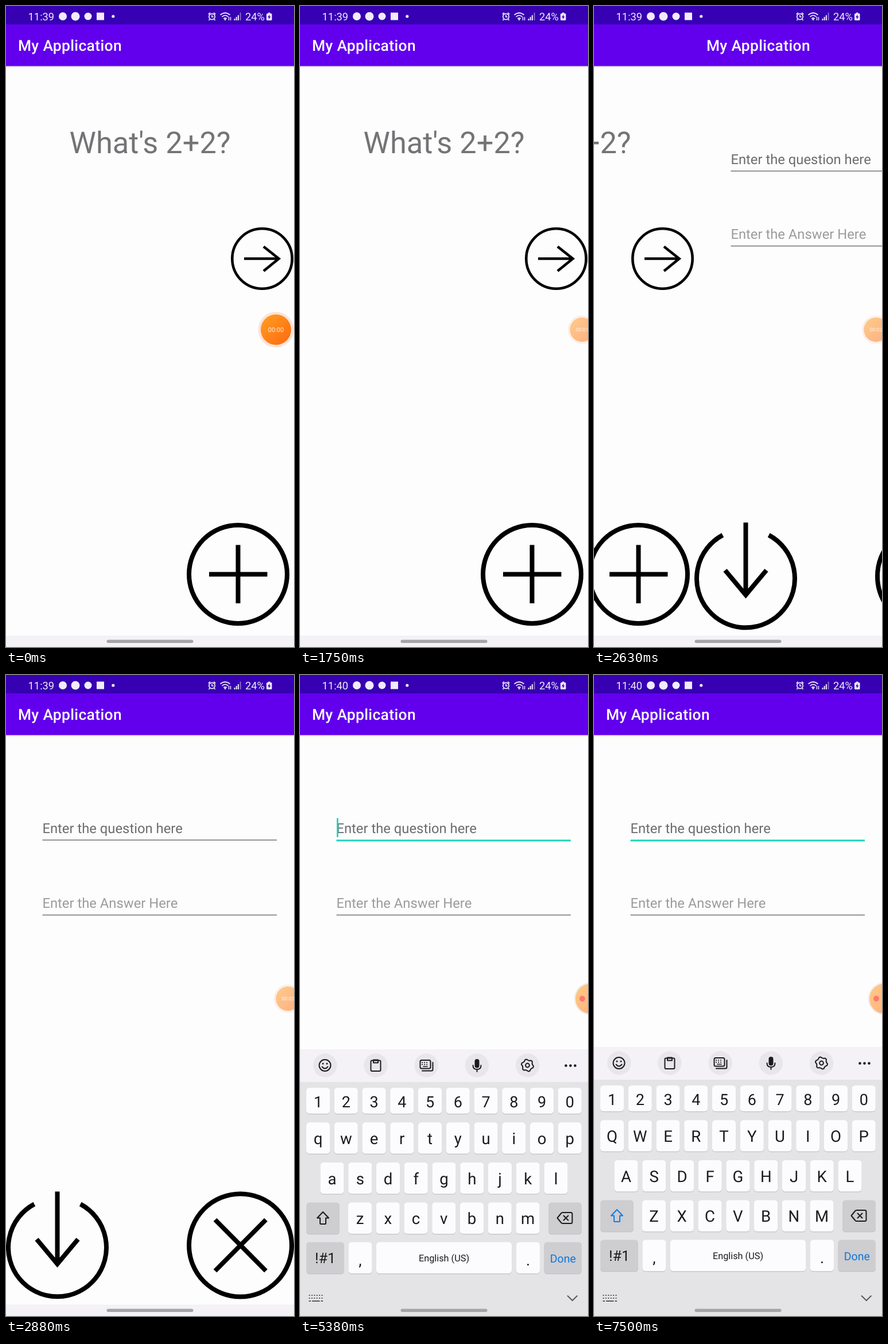
Write an HTML page that moves like this. It is 502 px wide and 1115 px high and loops after 8000 ms.

```html
<!DOCTYPE html>
<html lang="en">
<head>
<meta charset="utf-8">
<title>My Application</title>
<style>
html, body { margin: 0; width: 100%; height: 100%; overflow: hidden; background: #fefdfe; }
svg { display: block; width: 100vw; height: 100vh; font-family: Roboto, "Noto Sans", sans-serif; text-rendering: geometricPrecision; }
.title { font-size: 26.4px; font-weight: 500; letter-spacing: .0135em; fill: #fff; }
.status { font-size: 18.3px; fill: #f1ecfb; }
.hint { font-size: 23.8px; }
.ink { fill: none; stroke: #000; stroke-width: 8; }
.line { fill: none; stroke: #1b1b1e; stroke-width: 2; stroke-linecap: round; stroke-linejoin: round; }
.key { text-anchor: middle; }
</style>
</head>
<body>
<svg viewBox="0 0 502 1115" preserveAspectRatio="none">
  <defs>
    <linearGradient id="orange" x1="0" y1="0" x2="1" y2="1">
      <stop offset="0.1" stop-color="#ff9a20"/><stop offset="0.9" stop-color="#ff6d12"/>
    </linearGradient>
    <linearGradient id="shade" x1="0" y1="0" x2="0" y2="1">
      <stop offset="0" stop-color="#000" stop-opacity=".14"/><stop offset="1" stop-color="#000" stop-opacity="0"/>
    </linearGradient>
    <g id="page">
      <rect width="502" height="1115" fill="#fefdfe"/>
      <rect y="104" width="502" height="4" fill="url(#shade)"/>
      <rect y="30" width="502" height="74.5" fill="#6200ee"/>
      <text class="title" x="20.9" y="78">My Application</text>
    </g>
  </defs>

  <g id="quiz">
    <use href="#page"/>
    <text x="251" y="256" font-size="52.3" fill="#757376" text-anchor="middle">What's 2+2?</text>
    <g class="ink" style="stroke-width:4.6">
      <circle cx="446.5" cy="439.5" r="52.2"/>
      <path d="M415 439.5H476M449 418.5L475.5 439.5L449 461"/>
    </g>
    <g class="ink">
      <circle cx="404.5" cy="988.5" r="85.5"/>
      <path d="M354 988.5H455.5M404.5 937.5V1039"/>
    </g>
  </g>

  <g id="form">
    <use href="#page"/>
    <text class="hint" x="63.4" y="275" fill="#6d6b6e">Enter the question here</text>
    <text class="hint" x="63.4" y="405" fill="#9c9a9d">Enter the Answer Here</text>
    <rect id="underline" x="63.5" width="408.5"/>
    <rect x="63.5" y="416.7" width="408.5" height="1.6" fill="#7b797e"/>
    <rect id="caret" x="64" y="249" width="2.8" height="33" fill="#1cd6bc"/>
    <g class="ink">
      <path d="M49.3 920.4A85.5 85.5 0 1 0 129.7 920.4"/>
      <path d="M89.5 898.5V1024M53.5 981.5L89.5 1024.5L125.5 981.5"/>
      <circle cx="408.5" cy="992" r="89.5"/>
      <path d="M364.5 947.5L453 1036.5M453 947.5L364.5 1036.5"/>
    </g>
  </g>

  <rect width="502" height="32" fill="#3700b3"/>
  <text id="clock" class="status" x="38.6" y="24.5"></text>
  <g fill="#f1ecfb">
    <circle cx="99" cy="18" r="7"/><circle cx="121" cy="18" r="7.5"/><circle cx="143" cy="18" r="6.5"/>
    <rect x="158" y="11.5" width="13" height="13"/><circle cx="186.8" cy="18" r="2.6"/>
  </g>
  <g fill="none" stroke="#f1ecfb" stroke-width="1.7">
    <circle cx="359" cy="18.5" r="5.2"/>
    <path d="M359 15.5V19H361.8M352.8 14.5L356 11.7M365.2 14.5L362 11.7M355 23L353.5 25M363 23L364.5 25"/>
    <path d="M373.5 15.5Q382 8.5 390.5 15.5M376.5 18.8Q382 14 387.5 18.8M379.3 22Q382 19.8 384.7 22"/>
    <path d="M388.5 25V19M391.5 19V25" stroke-width="1.4"/>
    <path d="M398.5 25V22M401.7 25V19M404.9 25V16" stroke-width="2"/>
    <path d="M408.6 25V11.5" stroke-width="2" opacity=".45"/>
  </g>
  <circle cx="382" cy="23.6" r="1.5" fill="#f1ecfb"/>
  <text class="status" x="417" y="24.5">24%</text>
  <path d="M457 11.5H460.5V13H462Q463.5 13 463.5 14.5V23.5Q463.5 25 462 25H455.5Q454 25 454 23.5V14.5Q454 13 455.5 13H457Z" fill="#f1ecfb"/>
  <path d="M459.8 14.5L456 19.7H458.4L457.7 23.5L461.5 18.3H459.1Z" fill="#3700b3"/>

  <rect y="1095" width="502" height="20" fill="#f4f2f6"/>
  <g id="keyboard">
    <rect y="647" width="502" height="470" fill="#f4f2f6"/>
    <rect y="704" width="502" height="480" fill="#e4e3e6"/>
    <g id="tools" fill="#e8e6ea"></g>
    <g class="line">
      <circle cx="43.5" cy="675" r="10"/>
      <path d="M38.5 677.5Q43.5 683.5 48.5 677.5"/>
      <path d="M126 666.5H138.5Q140.5 666.5 140.5 668.5V683Q140.5 685 138.5 685H125.5Q123.5 685 123.5 683V668.5Q123.5 666.5 125.5 666.5M128 665.5H136V670.5H128Z"/>
      <rect x="209.5" y="666" width="18" height="14.5" rx="2.5"/>
      <path d="M213 684.5H229Q231.5 684.5 231.5 682V670"/>
      <path d="M213 670H225M213 673.5H225" stroke-dasharray="0.1 3.9"/>
      <path d="M215 677H222" stroke-width="1.6"/>
      <path d="M301.5 675Q301.5 682 308.5 682T315.5 675M308.5 682V686"/>
      <path id="gear"/>
      <circle cx="396.5" cy="675" r="3.4"/>
    </g>
    <rect x="304.5" y="664" width="8" height="15.5" rx="4" fill="#1b1b1e"/>
    <g fill="#1b1b1e">
      <circle cx="40" cy="672" r="1.5"/><circle cx="47" cy="672" r="1.5"/>
      <circle cx="463.5" cy="675.5" r="2.3"/><circle cx="471.5" cy="675.5" r="2.3"/><circle cx="479.5" cy="675.5" r="2.3"/>
    </g>
    <g id="keys"></g>
    <path id="shift" class="line" d="M40 930L50 940.5H45V950Q45 951 44 951H36Q35 951 35 950V940.5H30Z"/>
    <path class="line" d="M448.5 940.5L455 932.5Q456 931 458 931H472Q474.5 931 474.5 933.5V947.5Q474.5 950 472 950H458Q456 950 455 948.5ZM459.5 936.5L467.5 944.5M467.5 936.5L459.5 944.5"/>
  </g>
  <g id="navTools" fill="none" stroke="#5b5a5e" stroke-width="2">
    <path d="M15.5 1079H40M15.5 1084H40" stroke-dasharray="2 2.4"/>
    <path d="M15.5 1089H19M21 1089H34.5M36.5 1089H40"/>
    <path d="M466 1079.5L474.8 1088L483.5 1079.5"/>
  </g>
  <rect x="175.5" y="1102.5" width="151" height="5.5" rx="2.75" fill="#a5a4a7"/>

  <g id="bubble">
    <circle r="31" fill="#fae3d9"/>
    <circle r="26.5" fill="url(#orange)"/>
    <text id="timer" y="4" font-size="11" fill="#fff" fill-opacity=".85" text-anchor="middle"></text>
  </g>
  <g id="recorder">
    <circle cx="506" cy="563" r="28.5" fill="#f3efec"/>
    <circle cx="506" cy="563" r="26" fill="#fff"/>
    <circle cx="506" cy="563" r="26" fill="url(#orange)" opacity=".55"/>
    <circle cx="492" cy="563" r="5" fill="#fb7a74"/>
  </g>
</svg>
<script>
const LOOP = 8000, STEP = 125, WIDTH = 502;
const $ = id => document.getElementById(id);
const set = (el, attrs) => { for (const k in attrs) el.setAttribute(k, attrs[k]); };
const add = (parent, tag, attrs, text = "") => {
  const el = document.createElementNS("http://www.w3.org/2000/svg", tag);
  set(el, attrs);
  el.textContent = text;
  return parent.appendChild(el);
};

function key(x, y, w, h, label, { size = 27, color = "#1b1b1e", base = 38, fill = "#fcfbfe" } = {}) {
  add($("keys"), "rect", { x, y: y + 1.3, width: w, height: h, rx: 5.5, fill: "#c3c2c6" });
  add($("keys"), "rect", { x, y, width: w, height: h, rx: 5.5, fill });
  return add($("keys"), "text", { class: "key", x: x + w / 2, y: y + base, "font-size": size, fill: color }, label);
}
function row(chars, x, y, h, style) {
  return [...chars].map((c, i) => key(x + i * 48.75, y, 41, h, c, style));
}
row("1234567890", 11, 714, 45, { base: 33.5 });
const letterStyle = { size: 27.6, base: 37.6 };
const letters = [
  ...row("qwertyuiop", 11, 774.3, 54.5, letterStyle),
  ...row("asdfghjkl", 35.5, 844, 54.5, letterStyle),
  ...row("zxcvbnm", 84, 913.5, 54.5, letterStyle)
];
const grey = "#cecdd0";
key(11, 913.5, 58, 54.5, "", { fill: grey });
key(433, 913.5, 58, 54.5, "", { fill: grey });
key(11, 982.5, 66, 54.5, "!#1", { fill: grey, size: 25.2, base: 36.5 });
key(84.5, 982.5, 41, 54.5, ",", { base: 40 });
key(133, 982.5, 236, 54.5, "English (US)", { size: 16.3, base: 33.5 });
key(377, 982.5, 41, 54.5, ".", { base: 40 });
key(425.5, 982.5, 65.5, 54.5, "Done", { fill: grey, size: 19.6, color: "#0f78dc", base: 35 });

for (let i = 0; i < 5; i++) add($("tools"), "circle", { cx: 43.8 + i * 88.2, cy: 675, r: 20.7 });

// Radii alternate in pairs to form six teeth
const ring = Array.from({ length: 24 }, (_, i) => {
  const a = (i + .5) * Math.PI / 12, r = i % 4 < 2 ? 10.6 : 8.8;
  return (396.5 + r * Math.cos(a)).toFixed(1) + " " + (675 + r * Math.sin(a)).toFixed(1);
});
$("gear").setAttribute("d", "M" + ring.join("L") + "Z");

const clamp = v => Math.max(0, Math.min(1, v));
const ease = (t, from, to) => .5 - .5 * Math.cos(Math.PI * clamp((t - from) / (to - from)));
const show = (el, on) => { el.style.display = on ? "" : "none"; };

const ticks = [1000, 2250, 2875, 3875, 5000];
const lift = [[5125, 330], [5250, 60], [5375, 4], [5500, 0]];

function draw(now) {
  const t = Math.floor((now % LOOP) / STEP) * STEP;

  const slide = Math.round(WIDTH * ease(t, 2326, 2826));
  set($("quiz"), { transform: `translate(${-slide} 0)` });
  set($("form"), { transform: `translate(${WIDTH - slide} 0)` });
  show($("form"), slide > 0);

  $("clock").textContent = t < 3875 ? "11:39" : "11:40";
  $("timer").textContent = "00:0" + ticks.filter(s => t >= s).length;

  const dock = ease(t, 1000, 1750);
  set($("bubble"), {
    transform: `translate(${470.5 + 21 * dock} 563) scale(${1 - .2 * dock})`,
    opacity: 1 - .48 * dock
  });
  show($("bubble"), t < 5250);
  show($("recorder"), t >= 5250);

  const focus = t >= 5000;
  set($("underline"), focus ? { y: 286.4, height: 3, fill: "#1fd3ba" }
                            : { y: 286.3, height: 1.6, fill: "#7b797e" });
  show($("caret"), focus && Math.floor(t / 500) % 2 === 0);

  const pose = lift.filter(p => t >= p[0]).pop();
  show($("keyboard"), pose);
  show($("navTools"), pose);
  if (pose) set($("keyboard"), { transform: `translate(0 ${pose[1]})` });

  const caps = t >= 7000;
  for (const el of letters) {
    const c = el.textContent;
    el.textContent = caps ? c.toUpperCase() : c.toLowerCase();
  }
  $("shift").style.stroke = caps ? "#0f7ee6" : "#1b1b1e";
}

const start = performance.now();
function frame() {
  draw(performance.now() - start);
  requestAnimationFrame(frame);
}
frame();
</script>
</body>
</html>
```
